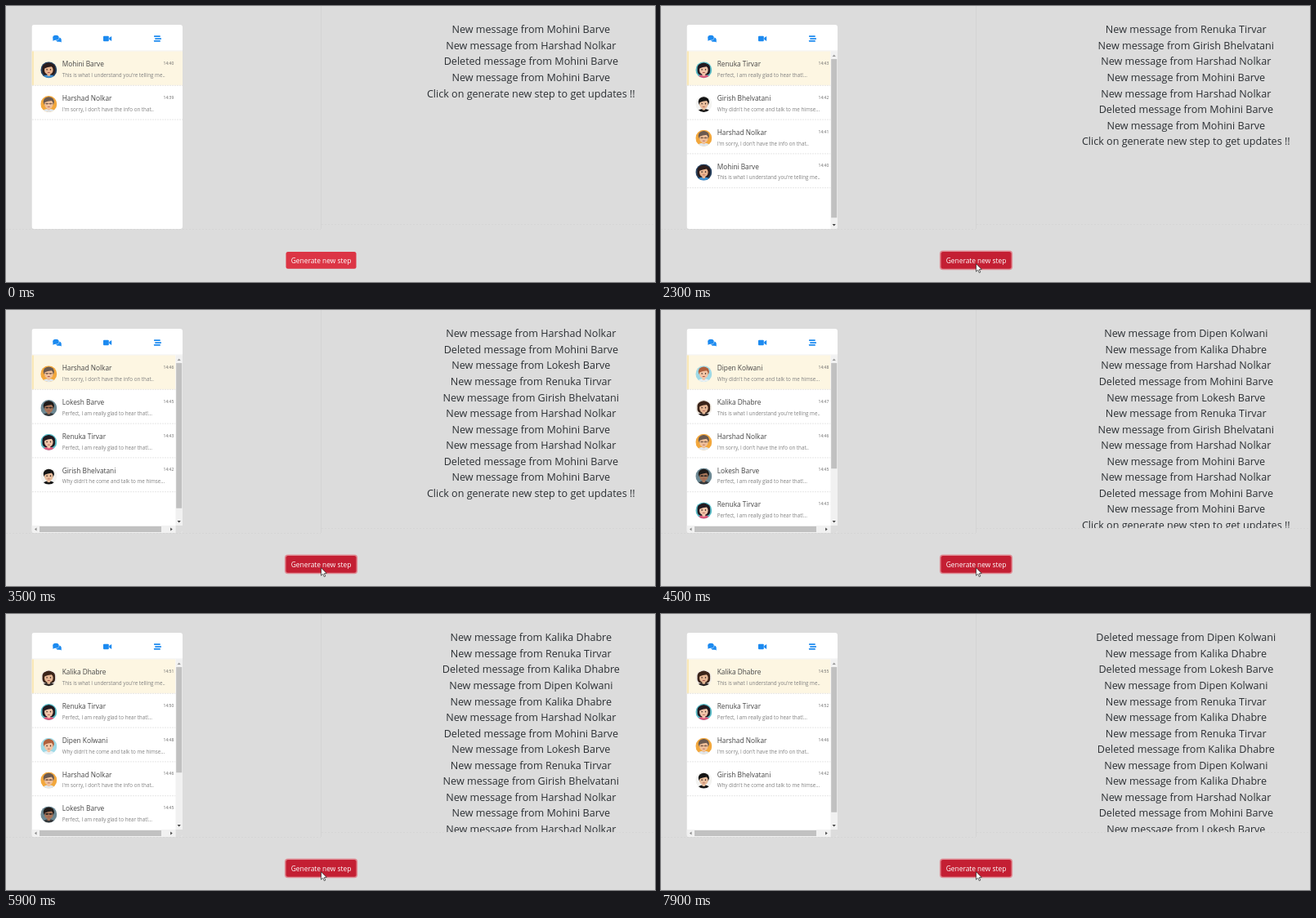
An HTML page with a canvas for the animation above (8 s loop, 794 by 338 pixels).

```html
<!DOCTYPE html>
<html lang="en">
<head>
<meta charset="utf-8">
<style>
html, body { margin: 0; width: 100%; height: 100%; overflow: hidden; background: #dcdcdc; }
canvas { display: block; }
</style>
</head>
<body>
<canvas id="stage" width="794" height="338"></canvas>
<script>
const c = document.getElementById('stage').getContext('2d');
const LOOP = 8000, ROW = 41.8, TOP = 55.5;
const GLAD = 'Perfect, I am really glad to hear that!...';
const UNDERSTAND = "This is what I understand you're telling me..";
const HIMSELF = "Why didn't he come and talk to me himse...";

const people = {
  mohini: { name: 'Mohini Barve', text: UNDERSTAND, bg: '#24405f', hair: '#2c1d1c', skin: '#e9b48f', shirt: '#3d8fd0', long: true },
  harshad: { name: 'Harshad Nolkar', text: "I'm sorry, I don't have the info on that..", bg: '#f2a73c', hair: '#6b5a50', skin: '#efc09a', shirt: '#dfe7ee', glasses: '#7a5a48' },
  renuka: { name: 'Renuka Tirvar', text: GLAD, bg: '#58bcc8', hair: '#221a20', skin: '#f0c4a8', shirt: '#d9577c', long: true },
  girish: { name: 'Girish Bhelvatani', text: HIMSELF, bg: '#f3f3f1', hair: '#151515', skin: '#e8bd9c', shirt: '#171717' },
  lokesh: { name: 'Lokesh Barve', text: GLAD, bg: '#6b8792', hair: '#1f1b1a', skin: '#a8765a', shirt: '#35393c', glasses: '#2a2422' },
  kalika: { name: 'Kalika Dhabre', text: UNDERSTAND, bg: '#f0ebe4', hair: '#3b2419', skin: '#e6b795', shirt: '#2b2524', long: true },
  dipen: { name: 'Dipen Kolwani', text: HIMSELF, bg: '#9ed9e6', hair: '#b0603c', skin: '#f3c4a4', shirt: '#e8f0f4' }
};

// [time, person, minute shown in the list, or 0 when the chat is deleted]
const steps = [
  [900, 'harshad', 41], [1700, 'girish', 42], [2100, 'renuka', 43], [2500, 'lokesh', 45],
  [2800, 'mohini', 0], [3500, 'harshad', 46], [3800, 'kalika', 47], [4100, 'dipen', 48],
  [4700, 'kalika', 0], [5500, 'renuka', 50], [5800, 'kalika', 51], [6200, 'renuka', 52],
  [6700, 'dipen', 53], [7100, 'lokesh', 0], [7500, 'kalika', 55], [7800, 'dipen', 0]
];

function stateAt(t) {
  const log = ['Click on generate new step to get updates !!'];
  let chats = [];
  const apply = (id, minute) => {
    chats = chats.filter(chat => chat.id !== id);
    if (minute) chats.unshift({ id, minute });
    log.unshift(`${minute ? 'New' : 'Deleted'} message from ${people[id].name}`);
  };
  apply('mohini', 37);
  apply('mohini', 0);
  apply('harshad', 39);
  apply('mohini', 40);
  const done = steps.filter(([time]) => time <= t);
  done.forEach(([, id, minute]) => apply(id, minute));
  return { log, chats, wide: done.length > 3 };
}

function rect(x, y, w, h, color, r = 0) {
  c.fillStyle = color;
  c.beginPath();
  c.roundRect(x, y, w, h, r);
  c.fill();
}

function ellipse(x, y, rx, ry, color) {
  c.fillStyle = color;
  c.beginPath();
  c.ellipse(x, y, rx, ry, 0, 0, Math.PI * 2);
  c.fill();
}

function poly(color, ...p) {
  c.fillStyle = color;
  c.beginPath();
  for (let i = 0; i < p.length; i += 2) c.lineTo(p[i], p[i + 1]);
  c.closePath();
  c.fill();
}

function label(text, x, y, size, color, align = 'left') {
  c.font = `${size}px "Open Sans", "Noto Sans", sans-serif`;
  c.textAlign = align;
  c.fillStyle = color;
  c.fillText(text, x, y);
}

function line(x1, y1, x2, y2, color, dash = []) {
  c.strokeStyle = color;
  c.lineWidth = 1;
  c.setLineDash(dash);
  c.beginPath();
  c.moveTo(x1, y1);
  c.lineTo(x2, y2);
  c.stroke();
  c.setLineDash([]);
}

function avatar(p, x, y) {
  c.save();
  c.translate(x, y);
  c.beginPath();
  c.arc(0, 0, 10, 0, Math.PI * 2);
  c.clip();
  rect(-10, -10, 20, 20, p.bg);
  if (p.long) rect(-7.8, -7.5, 15.6, 14, p.hair, 5);
  ellipse(0, 10.5, 8.5, 4.5, p.shirt);
  rect(-1.8, 3, 3.6, 4.5, p.skin, 1);
  ellipse(0, -2.8, 6.6, 6, p.hair);
  ellipse(0, 0, 5.3, 5.9, p.skin);
  poly(p.hair, -6, -1.5, -5.4, -6.2, 0, -8.2, 5.4, -6.2, 6, -1.5, 3.6, -4, -1.2, -3.2);
  const eye = p.glasses || '#3a2a25';
  ellipse(-2.2, -0.4, p.glasses ? 1.4 : 0.7, 0.9, eye);
  ellipse(2.2, -0.4, p.glasses ? 1.4 : 0.7, 0.9, eye);
  if (p.glasses) rect(-5, -0.8, 10, 0.6, eye);
  rect(-1.6, 2.9, 3.2, 0.8, '#a9534c', 0.4);
  c.restore();
}

function icons() {
  const blue = '#1c8af0';
  ellipse(61, 38.8, 3.8, 3, blue);
  poly(blue, 57.6, 39.5, 57.3, 42.8, 61, 41.3);
  ellipse(64.4, 41.2, 3.2, 2.6, blue);
  poly(blue, 65, 43.2, 68, 44.6, 67.3, 41);
  c.strokeStyle = '#fff';
  c.lineWidth = 0.5;
  c.beginPath();
  c.ellipse(61, 38.8, 4, 3.2, 0, -0.2, 1.6);
  c.stroke();
  rect(119, 36.7, 6.8, 6.6, blue, 1);
  poly(blue, 126.2, 39, 129.2, 37, 129.2, 43, 126.2, 41);
  [[181, 36.3], [182.2, 39.2], [181, 42.1]].forEach(([x, y]) => rect(x, y, 7.8, 1.7, blue, 0.4));
}

function chatRow({ id, minute }, i, right) {
  const p = people[id], y = TOP + i * ROW;
  if (i === 0) {
    rect(31.5, y, right - 31.5, ROW, '#fdf6e2');
    rect(31.5, y, 2.5, ROW, '#f9e8b8');
  }
  line(32, y + ROW, right, y + ROW, '#e6e6e6', [2, 1]);
  avatar(p, 52.3, y + 22.7);
  label(p.name, 68.7, y + 18.6, 8.3, '#444');
  label(`14:${minute}`, 205.3, y + 16.4, 5, '#666', 'right');
  label(p.text, 68.7, y + 31.4, 6.25, '#808080');
}

function scrollbars(rows, wide) {
  const bottom = wide ? 264 : 273, view = bottom - TOP, track = view - 19;
  rect(207.5, TOP, 8.5, view, '#f1f1f1');
  rect(208.2, 65, 7, track * view / (rows * ROW + 55), '#c1c1c1');
  poly('#999', 209.6, 62, 211.7, 59.5, 213.8, 62);
  poly('#444', 209.6, bottom - 6, 211.7, bottom - 3.5, 213.8, bottom - 6);
  if (!wide) return;
  rect(31.5, 264, 176, 9, '#f1f1f1');
  rect(207.5, 264, 8.5, 9, '#dcdcdc');
  rect(41, 265, 149, 7, '#c1c1c1');
  poly('#888', 37.5, 266.4, 35, 268.5, 37.5, 270.6);
  poly('#444', 201.2, 266.4, 203.7, 268.5, 201.2, 270.6);
}

function card({ chats, wide }) {
  const scrolls = chats.length > 3 || wide;
  c.save();
  c.beginPath();
  c.roundRect(31.5, 23, 184.5, 250, 3);
  c.clip();
  rect(31.5, 23, 184.5, 250, '#fff');
  icons();
  line(32, 55, 216, 55, '#eee');
  chats.forEach((chat, i) => chatRow(chat, i, scrolls ? 207.5 : 216));
  if (scrolls) scrollbars(chats.length, wide);
  c.restore();
}

function button(t) {
  const hover = t >= 700;
  if (hover) rect(340.9, 299.5, 89.2, 23.8, 'rgba(225,83,97,.6)', 4);
  rect(342.5, 301, 86, 20.8, hover ? '#c41f33' : '#dc3545', 2.5);
  label('Generate new step', 385.5, 314.6, 8.4, '#fff', 'center');
  if (!hover) return;
  c.save();
  c.translate(385.5, t < 900 ? 310 : 315.7);
  poly('#fff', 0, 0, 0, 9.5, 2.2, 7.5, 3.8, 11, 5.3, 10.3, 3.8, 7, 6.7, 6.8);
  c.strokeStyle = '#222';
  c.lineWidth = 0.7;
  c.stroke();
  c.restore();
}

function draw(t) {
  const state = stateAt(t);
  rect(0, 0, 794, 338, '#dcdcdc');
  line(385.5, 0, 385.5, 273, '#d3d3d3');
  line(0, 273.5, 385, 273.5, '#d5d5d5', [2, 2]);
  line(386, 267.5, 794, 267.5, '#d5d5d5', [2, 2]);
  card(state);
  c.save();
  c.beginPath();
  c.rect(386, 0, 408, 267);
  c.clip();
  state.log.forEach((text, i) => label(text, 642.3, 33.3 + i * 19.55, 12.58, '#2b2f33', 'center'));
  c.restore();
  button(t);
}

function tick() {
  draw(performance.now() % LOOP);
  requestAnimationFrame(tick);
}
tick();
</script>
</body>
</html>
```
